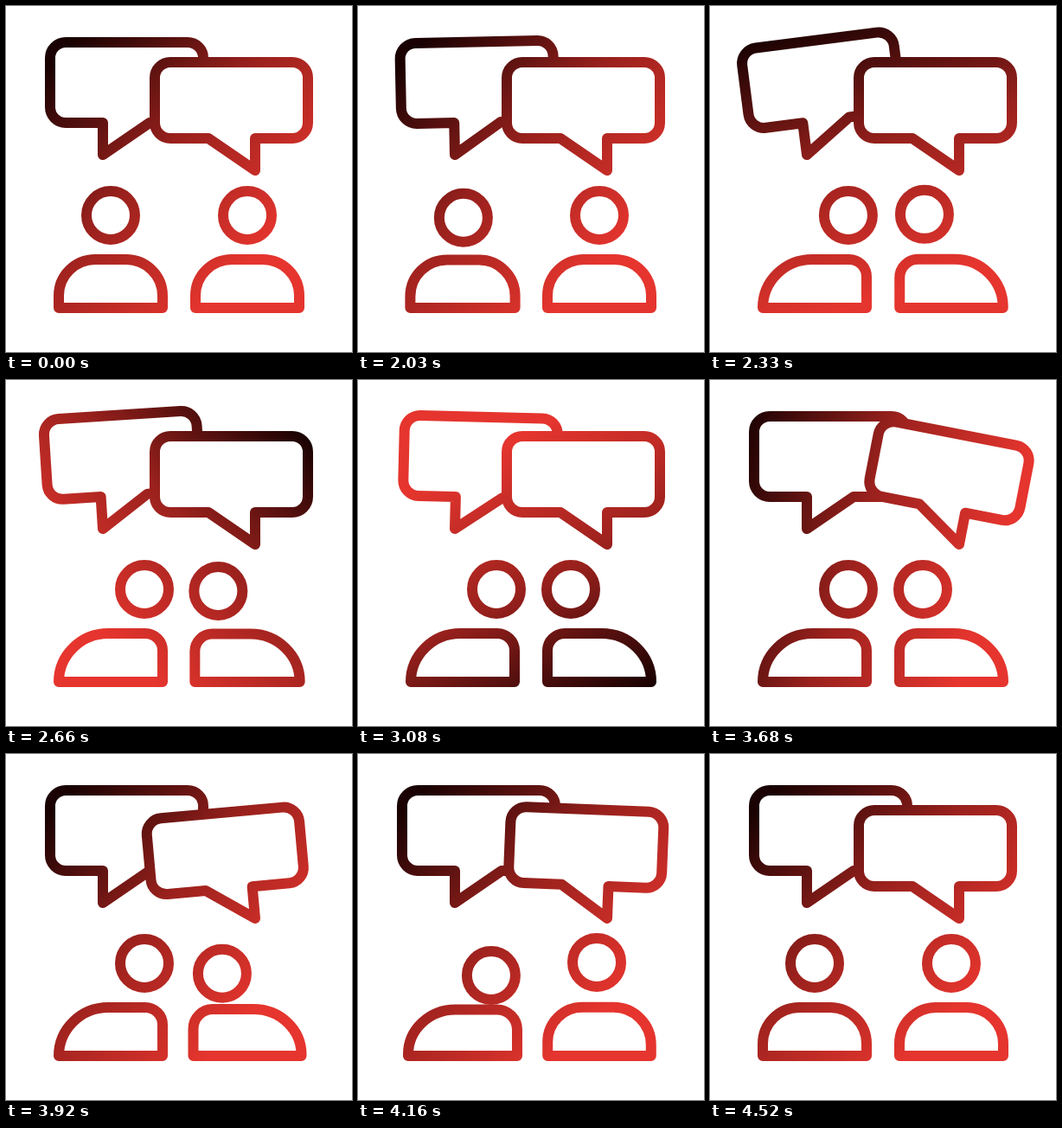
Write an HTML page with a canvas that moves like this. It is 400x400 px and loops after 4.55 s.

```html
<!DOCTYPE html>
<html lang="en">
<head>
<meta charset="utf-8">
<title>Conversation</title>
<style>
  html, body { margin: 0; height: 100%; overflow: hidden; background: #fff; }
  canvas { display: block; }
</style>
</head>
<body>
<canvas id="stage" width="400" height="400"></canvas>
<script>
const ctx = document.getElementById('stage').getContext('2d');
const LOOP = 4550, HOLD = 2030, STEP = 30;
const FLOOR = 349;

const mix = (a, b, p) => a + (b - a) * p;
const span = (t, start, length) => Math.min(1, Math.max(0, (t - start) / length));
const smooth = p => p * p * (3 - 2 * p);
const cosine = p => (1 - Math.cos(Math.PI * p)) / 2;
const bump = p => Math.sin(Math.PI * p) ** 2;
// Early squash followed by a slight stretch
const bounce = p => bump(p) * (1.5 - 2 * p);

// Damped swing of a bubble around the tip of its tail: [ms, degrees]
const SWING = [[0, 0], [195, -21], [510, 14.2], [730, -9], [930, 4], [1180, 0]];

function swing(t) {
  for (let i = 1; i < SWING.length; i++) {
    const [t0, a0] = SWING[i - 1], [t1, a1] = SWING[i];
    if (t < t1) return mix(a0, a1, cosine(span(t, t0, t1 - t0)));
  }
  return 0;
}

// Black to red, turning once around the stage centre
function ink(t) {
  const angle = (-135 + 360 * smooth(span(t, 2000, 2020))) * Math.PI / 180;
  const dx = 212 * Math.cos(angle), dy = 212 * Math.sin(angle);
  const g = ctx.createLinearGradient(200 + dx, 200 + dy, 200 - dx, 200 - dy);
  g.addColorStop(0.03, '#1a0202');
  g.addColorStop(0.42, '#9a211d');
  g.addColorStop(0.8, '#e5352e');
  return g;
}

// Bubble drawn relative to its tail tip; side is 1 when the tail leans left
function bubble(x, y, side, height, degrees) {
  const r = 18, near = 61, far = -116, base = -37, top = base - height;
  ctx.save();
  ctx.translate(x, y);
  ctx.rotate(degrees * Math.PI / 180);
  ctx.scale(side, 1);
  ctx.beginPath();
  ctx.moveTo(0, 0);
  ctx.lineTo(0, base);
  ctx.arcTo(near, base, near, top, r);
  ctx.arcTo(near, top, far, top, r);
  ctx.arcTo(far, top, far, base, r);
  ctx.arcTo(far, base, -54, base, r);
  ctx.lineTo(-54, base);
  ctx.closePath();
  ctx.restore();
  ctx.fill();
  ctx.stroke();
}

// turn: 0 faces front, 1 faces inwards; side is 1 for facing right
function person(x, side, headShift, turn, dip, widen) {
  const half = 60 + widen, top = 293 + widen * 0.8;
  const backX = mix(42, 57, turn), backY = mix(42, FLOOR - top, turn);
  const front = mix(42, 20, turn), k = 0.448;
  ctx.beginPath();
  ctx.arc(x + side * headShift, 242 + dip, 28, 0, Math.PI * 2);
  ctx.stroke();

  ctx.save();
  ctx.translate(x, 0);
  ctx.scale(side, 1);
  ctx.beginPath();
  ctx.moveTo(-half, FLOOR);
  ctx.lineTo(-half, top + backY);
  ctx.bezierCurveTo(-half, top + backY * k, -half + backX * k, top, -half + backX, top);
  ctx.lineTo(half - front, top);
  ctx.bezierCurveTo(half - front * k, top, half, top + front * k, half, top + front);
  ctx.lineTo(half, FLOOR);
  ctx.closePath();
  ctx.restore();
  ctx.stroke();
}

// Each turn dips the head and widens the body; a nod comes in between
function actor(t, x, side, shift, away, back, nod) {
  const out = span(t, away, 340), home = span(t, back, 400);
  const turn = smooth(out) - smooth(home);
  const squash = bounce(out) + bounce(home);
  const nodding = bump(span(t, nod.start, 300));
  person(x, side, shift * turn + nod.dip / 3 * nodding, turn,
    28 * squash + nod.dip * nodding, 6 * squash + nod.widen * nodding);
}

function draw(t) {
  ctx.fillStyle = '#fff';
  ctx.fillRect(0, 0, 400, 400);
  ctx.strokeStyle = ink(t);
  ctx.lineWidth = 12;
  ctx.lineJoin = 'round';

  bubble(112, 172, -1, 93, swing(t - 2000));
  bubble(288, 190, 1, 88, swing(t - 3117));
  actor(t, 121, 1, 39, 2000, 4060, { start: 3320, dip: 9, widen: 0 });
  actor(t, 279, -1, 33, 2040, 3834, { start: 2400, dip: 12, widen: 4 });
}

function frame(now) {
  const t = now % LOOP;
  draw(t < HOLD ? 0 : HOLD + Math.floor((t - HOLD) / STEP) * STEP);
  requestAnimationFrame(frame);
}
requestAnimationFrame(frame);
</script>
</body>
</html>
```
